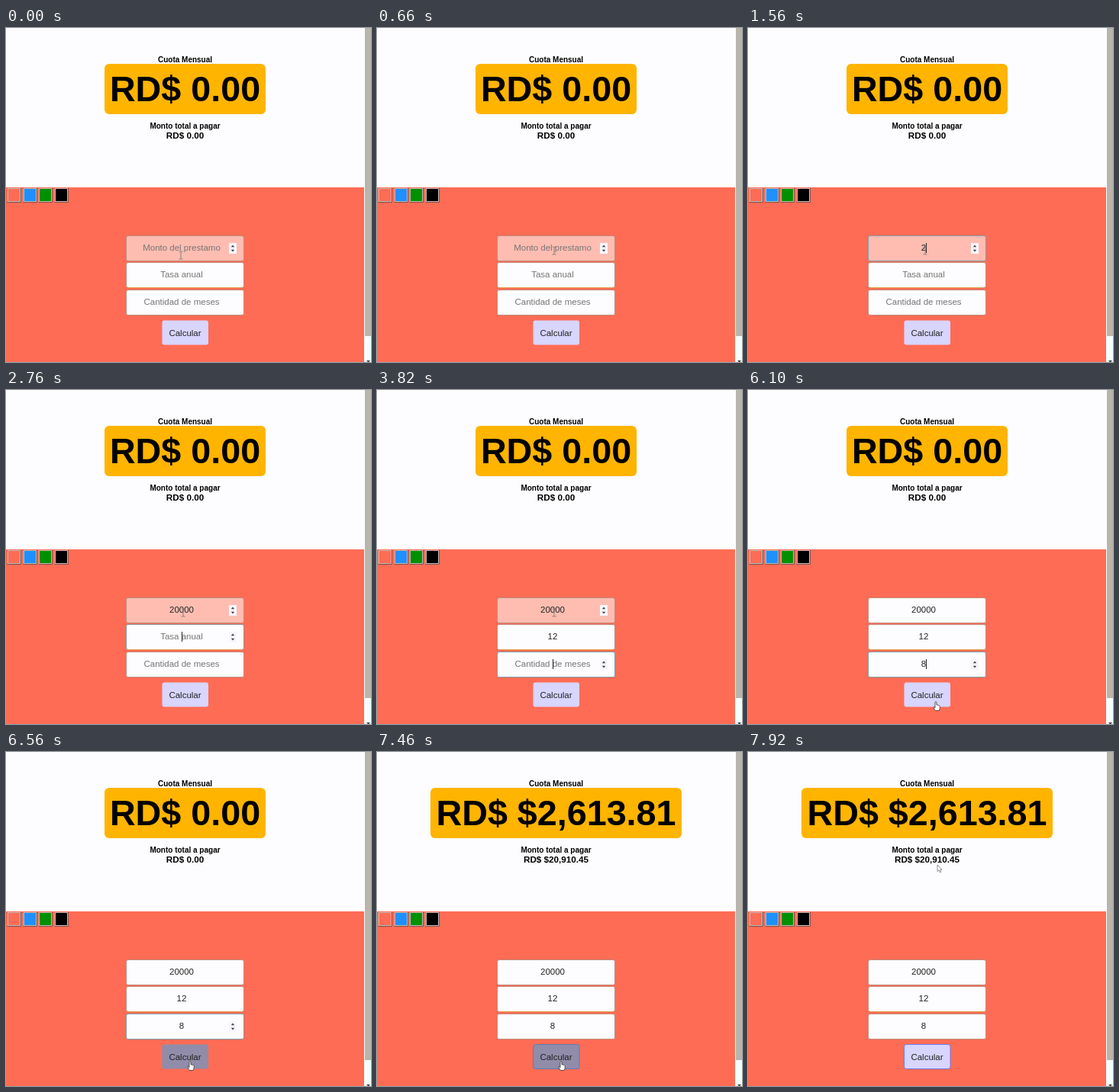
An HTML page for the animation above (8 s loop, 478 by 438 pixels).

```html
<!DOCTYPE html>
<html lang="es">
<head>
<meta charset="utf-8">
<title>Cuota mensual</title>
<style>
  html, body { margin: 0; width: 100%; height: 100%; overflow: hidden; background: #fdfdff; }
  svg { display: block; width: 478px; height: 438px; }
  text { font-family: Arial, "Liberation Sans", sans-serif; font-size: 11.5px; text-anchor: middle; fill: #222; }
  .bold { font-weight: bold; fill: #000; }
  .small { font-size: 10px; }
  .total { font-size: 11.7px; }
  .big { font-size: 46.7px; }
  .box { fill: #fdfdff; stroke: #c08a7c; }
  .focus .box { stroke: #7f9ca8; }
  .hover .box { fill: #ffbdb2; }
  .empty text { fill: #757575; }
  .spin, .caret { visibility: hidden; }
  .focus .spin, .hover .spin { visibility: visible; }
  .cursor { stroke-linejoin: round; }
</style>
</head>
<body>
<svg viewBox="0 0 478 438">
  <rect width="478" height="438" fill="#fdfdff"/>
  <rect y="209" width="469" height="229" fill="#ff6c55"/>
  <rect x="470" width="8" height="404" fill="#b8b6ac"/>
  <rect x="470" y="404" width="8" height="34" fill="#f1feff"/>
  <path d="M472 436h5l-2.5 2.5z" fill="#333"/>

  <text class="bold small" x="234.5" y="44.5">Cuota Mensual</text>
  <rect id="plate" y="47" height="66" rx="6" fill="#ffb400"/>
  <text id="quota" class="bold big" x="234.5" y="96"></text>
  <text class="bold small" x="234.5" y="132">Monto total a pagar</text>
  <text id="total" class="bold total" x="234.5" y="145"></text>

  <g id="swatches"></g>
  <g id="fields"></g>

  <rect id="button" x="204.5" y="383.5" width="60.5" height="32" rx="3"/>
  <text x="234.5" y="403.5">Calcular</text>

  <g id="cursor">
    <path class="cursor" d="M-2.5 -5h2l.5 .5 .5 -.5h2M0 -4.5v9M-2.5 5h2l.5 -.5 .5 .5h2" fill="none" stroke="#777" stroke-width=".9"/>
    <path class="cursor" d="M-1 .8Q0 -.6 1 .8V4.5L2.6 4.6 4.3 5.1 5.2 6V9L4.2 12H-.7L-3 8.3Q-3.4 6.6 -2.2 7L-1 8.2Z" fill="#fff" stroke="#333" stroke-width=".8"/>
    <path class="cursor" d="M0 0V8.6L2 6.8 3.4 10 4.8 9.4 3.5 6.2H6.1Z" fill="#fff" stroke="#777" stroke-width=".8"/>
  </g>
</svg>
<script>
  const LOOP = 8000, MID = 230, BLINK = 530;
  const TOPS = [272, 307, 343];
  const HINTS = ["Monto del prestamo", "Tasa anual", "Cantidad de meses"];
  const PRESS = 7020, RESULT = 7120;

  // time, field, value after the event
  const INPUT = [
    [670, 0, ""], [1560, 0, "2"], [1720, 0, "20"], [2040, 0, "200"], [2220, 0, "2000"], [2440, 0, "20000"],
    [2760, 1, ""], [3520, 1, "1"], [3640, 1, "12"],
    [3820, 2, ""], [4900, 2, "8"]
  ];
  // time, x, y of the pointer
  const PATH = [
    [120, 229, 298], [480, 232, 292], [5960, 232, 292], [6090, 246, 408.5],
    [6140, 246, 408.5], [6320, 241, 405.5], [7460, 241, 405.5], [7900, 248, 148]
  ];

  const $ = id => document.getElementById(id);
  const mix = (a, b, k) => a + (b - a) * k;
  const clamp = k => Math.min(1, Math.max(0, k));
  const smooth = k => k * k * (3 - 2 * k);
  const ramp = (t, from, length) => smooth(clamp((t - from) / length));

  $("swatches").innerHTML = ["#ff6c55", "#1e90ff", "#009000", "#000"].map((color, i) => {
    const x = 2 + Math.round(i * 20.7);
    return `<rect x="${x + .5}" y="210.5" width="16" height="17" fill="${color}" stroke="#c4bcb6"/>
      <path d="M${x + 17.5} 210v18.5h-18" fill="none" stroke="#7d5048"/>`;
  }).join("");

  $("fields").innerHTML = TOPS.map((y, i) => `<g>
    <rect class="box" x="157.5" y="${y + .5}" width="154" height="33" rx="2.5"/>
    ${i === 1 ? `<path d="M160 ${y + 33.5}h149" stroke="#e2a24c"/>` : ""}
    <text x="${MID}" y="${y + 20.3}"></text>
    <g class="spin">
      <rect x="292" y="${y + 10}" width="10" height="14" fill="#f6f7fd"/>
      <path d="M294.8 ${y + 15.3}l2.2 -2.8 2.2 2.8zM294.8 ${y + 18.7}l2.2 2.8 2.2 -2.8z" fill="#444"/>
    </g>
    <rect class="caret" y="${y + 10}" width="1" height="13" fill="#222"/>
  </g>`).join("");

  const fields = [...$("fields").children].map(g => ({
    g, text: g.querySelector("text"), caret: g.querySelector(".caret")
  }));
  const pointers = [...$("cursor").children];

  function pointerAt(t) {
    const next = PATH.findIndex(p => p[0] > t);
    if (next === 0) return PATH[0].slice(1);
    if (next < 0) return PATH[PATH.length - 1].slice(1);
    const a = PATH[next - 1], b = PATH[next], k = ramp(t, a[0], b[0] - a[0]);
    return [mix(a[1], b[1], k), mix(a[2], b[2], k)];
  }

  function drawFields(t, pointerY) {
    const values = ["", "", ""];
    let last = null;
    for (const event of INPUT) {
      if (event[0] > t) break;
      values[event[1]] = event[2];
      last = event;
    }
    const active = last && t < PRESS ? last[1] : -1;
    let hovered = -1;
    fields.forEach(({ g, text, caret }, i) => {
      const value = values[i], focus = i === active;
      const hover = pointerY >= TOPS[i] && pointerY < TOPS[i] + 34;
      if (hover) hovered = i;
      g.classList.toggle("focus", focus);
      g.classList.toggle("hover", hover);
      g.classList.toggle("empty", !value);
      text.textContent = value || HINTS[i];
      const lit = focus && (t - last[0]) % (2 * BLINK) < BLINK;
      caret.style.visibility = lit ? "visible" : "hidden";
      caret.setAttribute("x", Math.floor(MID + value.length * 3.2));
    });
    return hovered;
  }

  function drawButton(t) {
    const dark = ramp(t, 6090, 400) - ramp(t, 7520, 300);
    const light = [216, 213, 255], shade = [144, 140, 170];
    const button = $("button");
    button.setAttribute("fill", `rgb(${light.map((c, i) => Math.round(mix(c, shade[i], dark)))})`);
    button.setAttribute("stroke", `rgba(${Math.round(mix(104, 98, dark))},122,${Math.round(mix(245, 180, dark))},${ramp(t, PRESS, 200)})`);
  }

  function drawResult(done) {
    const width = done ? 329 : 211;
    $("plate").setAttribute("x", 234.5 - width / 2);
    $("plate").setAttribute("width", width);
    $("quota").textContent = done ? "RD$ $2,613.81" : "RD$ 0.00";
    $("total").textContent = done ? "RD$ $20,910.45" : "RD$ 0.00";
  }

  function frame() {
    const t = performance.now() % LOOP;
    const [x, y] = pointerAt(t);
    const hovered = drawFields(t, y);
    drawButton(t);
    drawResult(t >= RESULT);
    const kind = hovered >= 0 ? 0 : y >= 384 ? 1 : 2;
    pointers.forEach((p, i) => p.style.display = i === kind ? "" : "none");
    $("cursor").setAttribute("transform", `translate(${x} ${y})`);
    requestAnimationFrame(frame);
  }
  frame();
</script>
</body>
</html>
```
